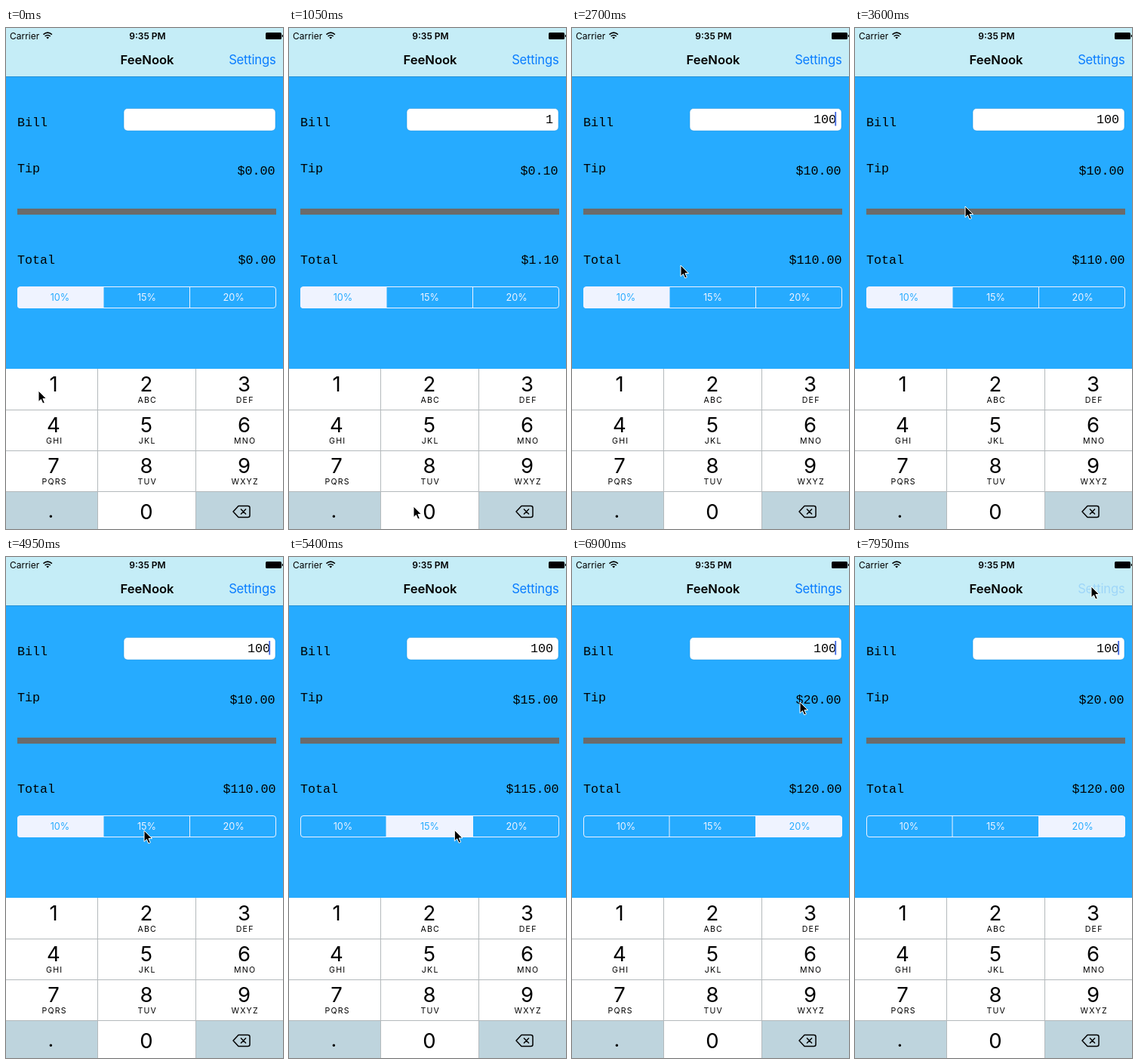
Recreate the animation shown at these times as an HTML page. Size 367 by 663 pixels, loop 8 s.

```html
<!DOCTYPE html>
<html lang="en">
<head>
<meta charset="utf-8">
<title>Tip calculator</title>
<style>
  html, body { margin: 0; width: 100%; height: 100%; overflow: hidden; background: #26abff; }
  svg { display: block; width: 367px; height: 663px; font-family: Inter, Roboto, sans-serif; }
  .mono { font: 16.7px "Liberation Mono", "Courier New", monospace; }
  .mid { text-anchor: middle; }
  .end { text-anchor: end; }
  .digit { font-size: 27.5px; }
  .letters { font-size: 10.6px; letter-spacing: 1.2px; }
</style>
</head>
<body>
<svg viewBox="0 0 367 663">
  <rect width="367" height="663" fill="#26abff"/>
  <rect width="367" height="64" fill="#c5edf7"/>
  <rect y="64" width="367" height="1" fill="#2290d6"/>

  <g font-size="12">
    <text x="5" y="14.5">Carrier</text>
    <text x="187.5" y="14.5" class="mid" font-weight="600">9:35 PM</text>
  </g>
  <g fill="none" stroke="#000" stroke-width="1.6">
    <path d="M49.5 8.6Q55.2 3.8 60.9 8.6M51.6 11Q55.2 8 58.8 11"/>
    <path d="M53.3 12.4Q55.2 10.9 57.1 12.4L55.2 14.6Z" fill="#000" stroke="none"/>
  </g>
  <rect x="344" y="6" width="21" height="9" rx="1.5"/>
  <rect x="365.8" y="9" width="1.2" height="3"/>

  <text x="187" y="48" class="mid" font-size="16.6" font-weight="600">FeeNook</text>
  <text id="settings" x="357.5" y="48" class="end" font-size="16.6" letter-spacing="-.2" fill="#087cff">Settings</text>

  <rect x="156" y="106.5" width="201" height="29.5" rx="5" fill="#fff" stroke="#1b8edb" stroke-width=".5"/>
  <g class="mono">
    <text x="15" y="130">Bill</text>
    <text x="15" y="191">Tip</text>
    <text x="15" y="311.5">Total</text>
    <text id="bill" x="350" y="125.5" class="end"></text>
    <text id="tip" x="356.5" y="194" class="end"></text>
    <text id="total" x="357.5" y="311.5" class="end"></text>
  </g>
  <rect id="caret" x="348.3" y="111" width="1.8" height="18.5" fill="#4169e1"/>
  <rect x="15" y="239" width="343" height="8" fill="#6b6b6b"/>

  <g id="segments"></g>
  <g id="keypad"></g>
  <path id="cursor" d="M0 0V14.6L3.4 11.5L5.8 17L8.3 15.9L5.9 10.6H10.5Z" stroke="#fff" stroke-width="1"/>
</svg>
<script>
const LOOP = 8000, STEP = 150;
const BLUE = [38, 171, 255], PALE = [239, 243, 255];
const $ = id => document.getElementById(id);

function add(parent, tag, attrs, text = '') {
  const node = document.createElementNS('http://www.w3.org/2000/svg', tag);
  for (const name in attrs) node.setAttribute(name, attrs[name]);
  node.textContent = text;
  return parent.appendChild(node);
}

// Tip selector
const segmentShapes = [
  'M129 342.5H19a4 4 0 0 0-4 4V367a4 4 0 0 0 4 4H129Z',
  'M129 342.5H243.5V371H129Z',
  'M243.5 342.5H354a4 4 0 0 1 4 4V367a4 4 0 0 1-4 4H243.5Z'
];
const segments = segmentShapes.map((d, i) => ({
  fill: add($('segments'), 'path', { d, fill: '#eff3ff' }),
  label: add($('segments'), 'text',
    { x: 71.5 + 115 * i, y: 361, class: 'mid', 'font-size': 12.7 }, `${10 + 5 * i}%`)
}));
add($('segments'), 'path', {
  d: 'M129 342.5V371M243.5 342.5V371M19 342.5H354a3.5 3.5 0 0 1 3.5 3.5V367a3.5 3.5 0 0 1-3.5 3.5H19a3.5 3.5 0 0 1-3.5-3.5V346a3.5 3.5 0 0 1 3.5-3.5Z',
  fill: 'none', stroke: '#eff3ff'
});

// Number pad
const pad = $('keypad'), GREY = '#bed4dd';
add(pad, 'rect', { y: 451, width: 367, height: 212, fill: '#fff' });
add(pad, 'rect', { y: 614, width: 121, height: 49, fill: GREY });
add(pad, 'rect', { x: 252, y: 614, width: 115, height: 49, fill: GREY });
const zeroKey = add(pad, 'rect', { x: 122, y: 614, width: 129, height: 49, fill: '#fff' });
add(pad, 'path', {
  d: 'M0 505.5H367M0 559.5H367M0 613.5H367M121.5 451V663M251.5 451V663',
  stroke: '#b4b9bc', fill: 'none'
});
const columns = [63, 186, 315.5];
['', 'ABC', 'DEF', 'GHI', 'JKL', 'MNO', 'PQRS', 'TUV', 'WXYZ'].forEach((letters, i) => {
  const x = columns[i % 3], y = 480.5 + 54 * Math.floor(i / 3);
  add(pad, 'text', { x, y, class: 'mid digit' }, i + 1);
  add(pad, 'text', { x: x + 1.2, y: y + 15.5, class: 'mid letters' }, letters);
});
add(pad, 'text', { x: 186, y: 650, class: 'mid digit' }, '0');
add(pad, 'text', { x: 59.5, y: 648, class: 'mid', 'font-size': 24, 'font-weight': 500 }, '.');
add(pad, 'path', {
  d: 'M308 632.5H320.5Q323 632.5 323 635V645Q323 647.5 320.5 647.5H308L301 640ZM311 636.5L318 643.5M318 636.5L311 643.5',
  fill: 'none', stroke: '#000', 'stroke-width': 1.5, 'stroke-linejoin': 'round'
});

// Pointer path: time, x, y
const path = [
  [0, 43, 480], [300, 43, 480], [1050, 165, 633], [1800, 165, 633],
  [2250, 121, 480], [2700, 144, 314], [2850, 144, 240], [3300, 146, 236],
  [3600, 146, 236], [3900, 77, 278], [4050, 77, 278], [4800, 183, 362],
  [5100, 183, 362], [6000, 292, 360], [6300, 292, 360], [6900, 302, 192],
  [7050, 302, 192], [7800, 313, 39], [LOOP, 313, 39]
];

function pointerAt(t) {
  const i = path.findIndex(point => point[0] > t);
  const [t0, x0, y0] = path[i - 1], [t1, x1, y1] = path[i];
  const k = (t - t0) / (t1 - t0);
  return [x0 + (x1 - x0) * k, y0 + (y1 - y0) * k];
}

// The caret restarts its one-second blink after each typed digit.
function caretAt(t) {
  if (t < 150) return 0;
  const typed = t >= 1650 ? 1650 : t >= 1350 ? 1350 : 150;
  const phase = (t - typed) % 1000;
  if (phase < 480) return 1;
  return phase < 560 ? 0.65 : 0;
}

function selectionAt(t) {
  if (t < 5100) return [1, 0, 0];
  if (t < 5250) return [0.6, 0.4, 0];
  if (t < 6150) return [0, 1, 0];
  if (t < 6300) return [0, 1, 0.15];
  return [0, 0, 1];
}

const money = value => '$' + value.toFixed(2);
const mix = (a, b, k) => `rgb(${a.map((v, i) => Math.round(v + (b[i] - v) * k))})`;

function render(time) {
  const t = Math.floor(time % LOOP / STEP) * STEP;
  const bill = t < 150 ? 0 : t < 1350 ? 1 : t < 1650 ? 10 : 100;
  const rate = t < 5100 ? 0.1 : t < 6150 ? 0.15 : 0.2;

  $('bill').textContent = bill || '';
  $('tip').textContent = money(bill * rate);
  $('total').textContent = money(bill * (1 + rate));
  $('caret').setAttribute('opacity', caretAt(t));
  $('settings').setAttribute('opacity', t >= 7950 ? 0.2 : 1);
  zeroKey.setAttribute('fill', t === 1200 ? GREY : '#fff');
  $('cursor').setAttribute('transform', `translate(${pointerAt(t)})`);

  selectionAt(t).forEach((amount, i) => {
    segments[i].fill.setAttribute('fill-opacity', amount);
    segments[i].label.setAttribute('fill', mix(PALE, BLUE, amount));
  });
}

function tick() {
  render(performance.now());
  requestAnimationFrame(tick);
}
tick();
</script>
</body>
</html>
```
